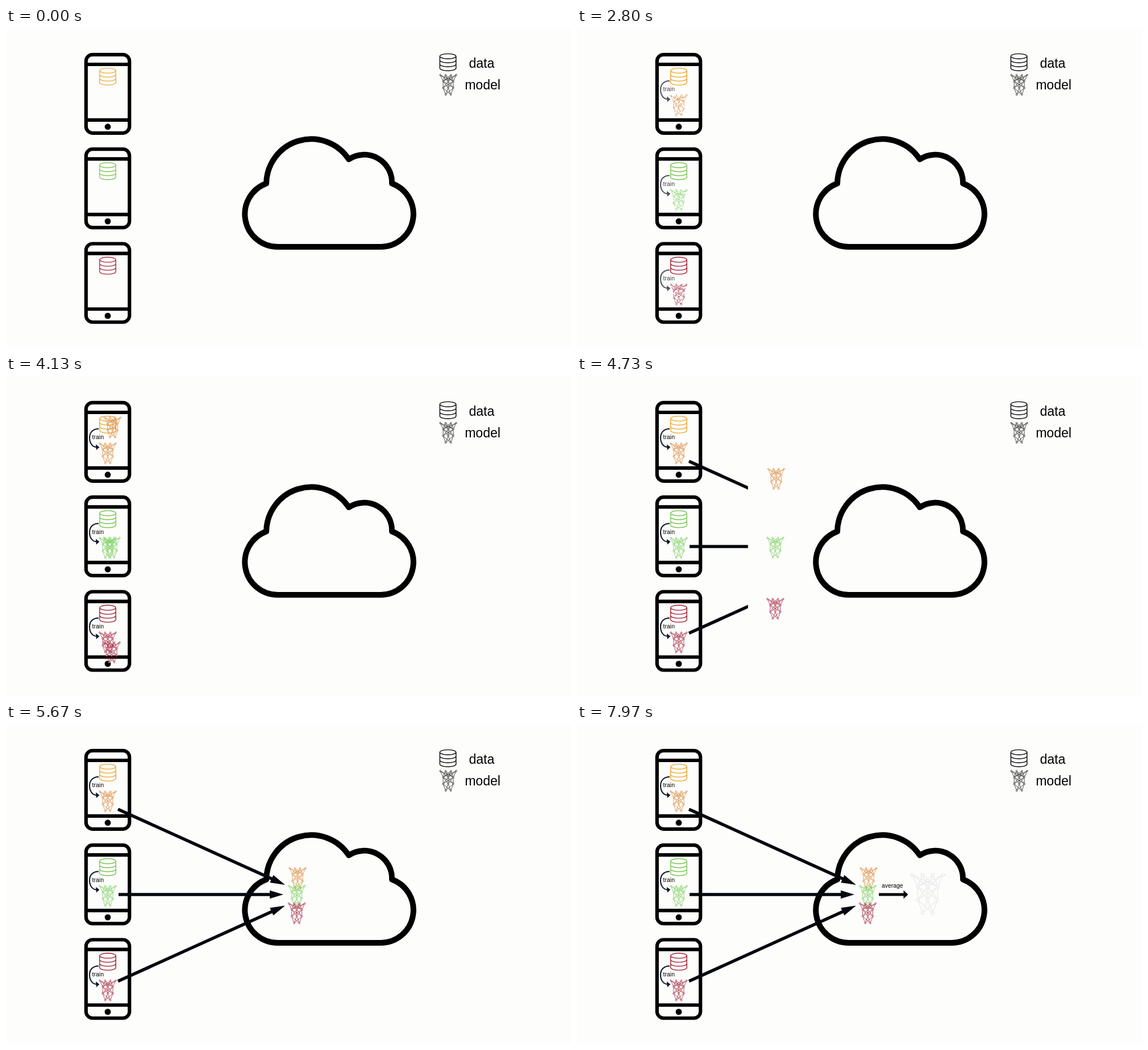
An HTML page that plays this animation: 994 by 563 pixels, repeating every 8000 ms.

```html
<!DOCTYPE html>
<html lang="en">
<head>
<meta charset="utf-8">
<title>Model averaging</title>
<style>
  html, body { margin: 0; width: 100%; height: 100%; overflow: hidden; background: #fdfdfc; }
  svg { display: block; position: absolute; left: 0; top: 0; }
  text { font-family: "Liberation Sans", Arial, sans-serif; }
</style>
</head>
<body>
<svg id="stage" width="994" height="563" viewBox="0 0 994 563">
  <defs>
    <clipPath id="sendClip"><rect id="sendWipe" x="190" y="130" width="0" height="340"/></clipPath>
    <clipPath id="meanClip"><rect id="meanWipe" x="528" y="270" width="0" height="50"/></clipPath>
  </defs>
</svg>
<script>
const LOOP = 8000;
const PAPER = '#fdfdfc';
const INK = '#03070d';
const stage = document.getElementById('stage');

function add(parent, tag, attrs = {}, text) {
  const node = document.createElementNS('http://www.w3.org/2000/svg', tag);
  for (const key in attrs) node.setAttribute(key, attrs[key]);
  if (text) node.textContent = text;
  parent.append(node);
  return node;
}

const group = (parent, attrs) => add(parent, 'g', attrs);
const label = (parent, x, y, size, text) =>
  add(parent, 'text', { x, y, 'font-size': size }, text);

let seed = 7;
function random() {
  seed = (seed * 16807) % 2147483647;
  return seed / 2147483647;
}

function drawPhone(parent, dy) {
  const g = group(parent, { transform: `translate(0 ${dy})`, fill: 'none', stroke: '#000', 'stroke-width': 6.2 });
  add(g, 'rect', { x: 140.8, y: 46.8, width: 76.4, height: 138, rx: 11.5 });
  add(g, 'path', { d: 'M141 64H217M141 161.8H217' });
  add(g, 'circle', { cx: 179, cy: 173.7, r: 5.4, fill: '#000', stroke: 'none' });
}

function drawData(parent, x, y, color) {
  const g = group(parent, { transform: `translate(${x} ${y})`, fill: 'none', stroke: color, 'stroke-width': 1.4 });
  add(g, 'ellipse', { rx: 14.2, ry: 4.4 });
  const arcs = [7, 14, 21].map(v => `M-14.2 ${v}A14.2 4.4 0 0 0 14.2 ${v}`).join('');
  add(g, 'path', { d: 'M-14.2 0V21M14.2 0V21' + arcs });
  return g;
}

// Fully connected layers, listed as [y, node positions].
const LAYERS = [
  [-17.3, [-14, -4.7, 4.7, 14]],
  [-6.5, [-9, 0, 9]],
  [5.3, [-9, 0, 9]],
  [17.3, [-4.5, 4.5]]
];

function drawModel(parent, x, y, color, scale = 1) {
  const g = group(parent, {
    transform: `translate(${x} ${y}) scale(${scale})`,
    stroke: color, 'stroke-width': 0.8, fill: PAPER
  });
  LAYERS.forEach(([y1, xs], i) => {
    if (i + 1 === LAYERS.length) return;
    const [y2, next] = LAYERS[i + 1];
    for (const x1 of xs) for (const x2 of next) add(g, 'line', { x1, y1, x2, y2 });
  });
  for (const [cy, xs] of LAYERS) for (const cx of xs) add(g, 'circle', { cx, cy, r: 1.3 });
  return g;
}

function drawTrain(parent, dy) {
  const g = group(parent, { transform: `translate(0 ${dy})` });
  add(g, 'path', {
    d: 'M163 93C152 93 147 100 147 108.500C147 118 152 125 159 125',
    fill: 'none', stroke: '#0b1626', 'stroke-width': 2
  });
  add(g, 'path', { d: 'M158 120.300L164.300 125.200L158.800 130.300Z', fill: '#0b1626' });
  label(g, 151.6, 111.3, 10.5, 'train');
}

function drawArrow(parent, x1, y1, x2, y2, width, headLength, headHalf) {
  const length = Math.hypot(x2 - x1, y2 - y1);
  const angle = Math.atan2(y2 - y1, x2 - x1) * 180 / Math.PI;
  const neck = length - headLength;
  const w = width / 2;
  add(parent, 'path', {
    transform: `translate(${x1} ${y1}) rotate(${angle})`,
    d: `M0 ${-w}H${neck}V${-headHalf}L${length} 0L${neck} ${headHalf}V${w}H0Z`,
    fill: INK
  });
}

const clients = [
  { dy: 0, data: '#eda52f', model: '#d9883a', from: [-30, -30], to: [513, 271] },
  { dy: 166.4, data: '#79c653', model: '#76cd58', from: [-31.5, 302], to: [511.5, 302] },
  { dy: 332.7, data: '#a01a2c', model: '#a3213a', from: [-31.5, 588.6], to: [511.5, 333] }
];

add(stage, 'path', {
  d: 'M458 273.500A79 79 0 0 1 603 231A49 49 0 0 1 679 273.500' +
     'A57.500 57.500 0 0 1 659 385H478A57.500 57.500 0 0 1 458 273.500Z',
  fill: 'none', stroke: '#000', 'stroke-width': 10, 'stroke-linejoin': 'round'
});

drawData(stage, 777.5, 49.8, '#000');
drawModel(stage, 778, 100, '#222');
label(stage, 814.5, 70, 23, 'data');
label(stage, 807.2, 108, 23, 'model');

for (const c of clients) drawPhone(stage, c.dy);
const dataLayer = group(stage);
const trainLayer = group(stage);
for (const c of clients) {
  drawData(dataLayer, 179, 75 + c.dy, c.data);
  drawTrain(trainLayer, c.dy);
  c.local = drawModel(stage, 179, 136 + c.dy, c.model);
  c.parts = [...c.local.children].map(node => {
    const period = 5 + 5 * random();
    node.setAttribute('stroke-dashoffset', period * random());
    return { node, period };
  });
}

const sendLayer = group(stage, { 'clip-path': 'url(#sendClip)' });
drawArrow(sendLayer, 197, 150, 491, 283, 5.6, 26, 7.3);
drawArrow(sendLayer, 198, 300, 488, 300, 5.6, 24, 7.3);
drawArrow(sendLayer, 197, 452.5, 491, 319.5, 5.6, 26, 7.3);

const meanLayer = group(stage, { 'clip-path': 'url(#meanClip)' });
drawArrow(meanLayer, 531, 300, 582.5, 300, 5, 8, 7.5);
label(meanLayer, 536, 288, 10.4, 'average');

for (const c of clients) c.flying = drawModel(stage, ...c.from, c.model);
const meanModel = drawModel(stage, 617, 299, '#10102a', 1.95);

const sendWipe = document.getElementById('sendWipe');
const meanWipe = document.getElementById('meanWipe');

const ramp = (t, start, end) => Math.min(1, Math.max(0, (t - start) / (end - start)));
const mix = (a, b, p) => a + (b - a) * p;

// Strokes grow out of scattered dashes until they join.
function scatter(client, p) {
  client.local.setAttribute('visibility', p > 0 ? 'visible' : 'hidden');
  for (const { node, period } of client.parts) {
    const dash = p < 1 ? `${period * p} ${period * (1 - p)}` : 'none';
    node.setAttribute('stroke-dasharray', dash);
  }
}

function render(t) {
  const trained = ramp(t, 1330, 3330);
  const sent = ramp(t, 3330, 5330);

  dataLayer.setAttribute('opacity', ramp(t, -1830, 170));
  trainLayer.setAttribute('opacity', trained);
  for (const c of clients) {
    scatter(c, trained);
    const x = mix(c.from[0], c.to[0], sent);
    const y = mix(c.from[1], c.to[1], sent);
    c.flying.setAttribute('transform', `translate(${x} ${y})`);
    c.flying.setAttribute('visibility', sent > 0 ? 'visible' : 'hidden');
  }
  sendWipe.setAttribute('width', mix(0, 304, ramp(t, 4330, 5430)));
  meanWipe.setAttribute('width', mix(0, 58, ramp(t, 6390, 6900)));
  meanModel.setAttribute('opacity', ramp(t, 7870, 9370));
}

const begin = performance.now();
function tick() {
  render((performance.now() - begin) % LOOP);
  requestAnimationFrame(tick);
}
tick();
</script>
</body>
</html>
```
